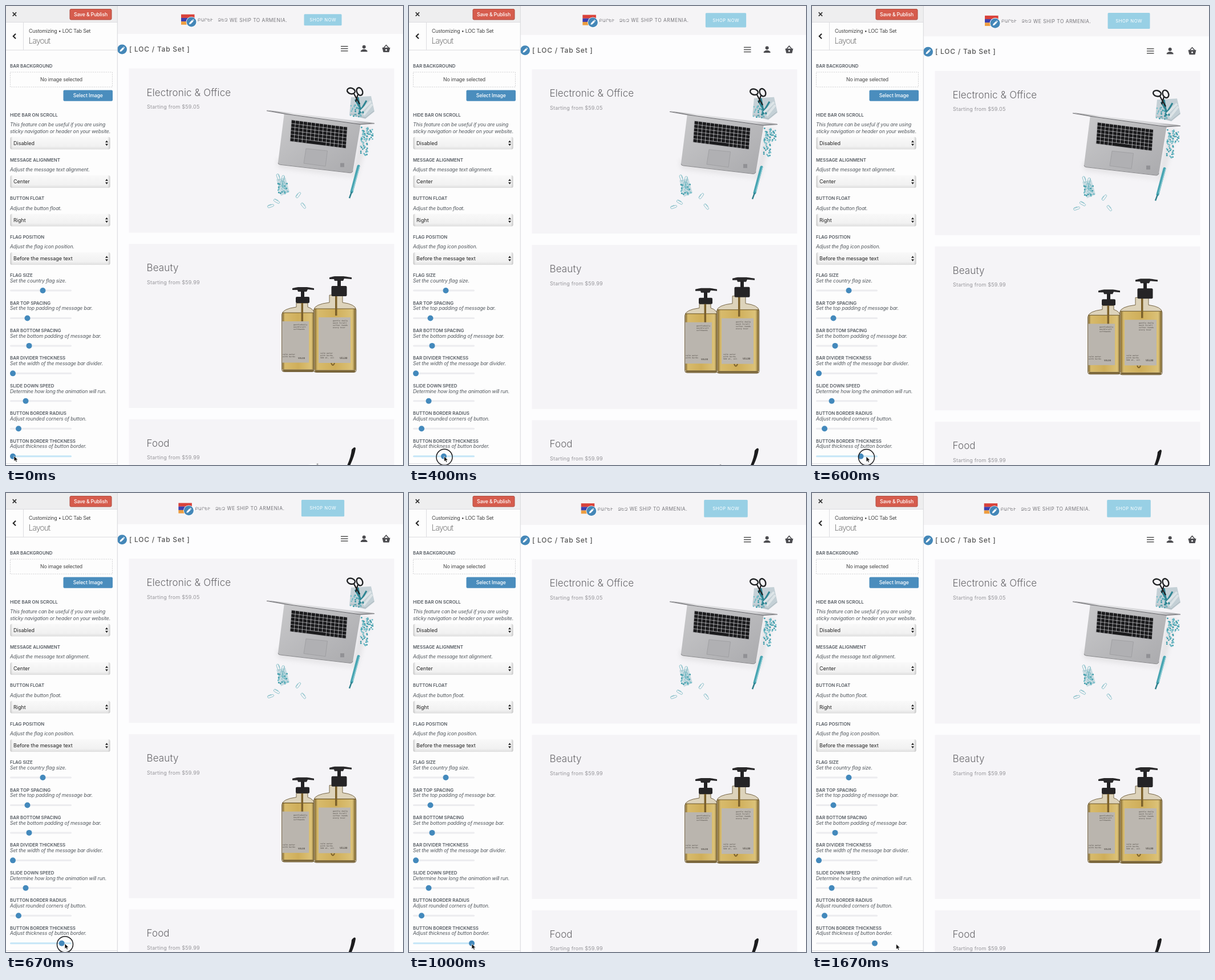
An HTML page for the animation above (1740 ms loop, 696 px wide and 805 px high).

```html
<!DOCTYPE html>
<html lang="en">
<head>
<meta charset="utf-8">
<title>Layout panel</title>
<style>
html, body { margin: 0; width: 100%; height: 100%; overflow: hidden; background: #fdfdfe; }
svg { display: block; width: 100vw; height: 100vh; font-family: Inter, "Open Sans", sans-serif; }
.label { font-size: 7.9px; font-weight: 600; fill: #555b62; }
.note { font-size: 8.7px; font-style: italic; letter-spacing: -.15px; fill: #50565c; }
.ui { font-size: 8.7px; letter-spacing: -.15px; fill: #444; }
.button { font-weight: 500; fill: #fff; text-anchor: middle; }
.value { font-size: 9px; fill: #222; }
.title { font-size: 17px; font-weight: 300; letter-spacing: .12px; fill: #68676b; }
.price { font-size: 9px; letter-spacing: .22px; fill: #97969b; }
.brand { font-size: 12px; font-weight: 500; letter-spacing: .75px; fill: #555; }
.message { font-size: 8.4px; letter-spacing: .5px; fill: #77767b; }
.armenian { font: 7.3px "DejaVu Sans", sans-serif; letter-spacing: .3px; fill: #77767b; }
.tiny { font: 700 3.1px "DejaVu Sans Mono", monospace; letter-spacing: .35px; fill: #5d5852; }
</style>
</head>
<body>
<svg id="stage" viewBox="0 0 696 805" preserveAspectRatio="none">
  <defs>
    <linearGradient id="select" x2="0" y2="1">
      <stop stop-color="#f9f9f9"/><stop offset=".75" stop-color="#f1f1f1"/><stop offset="1" stop-color="#dedede"/>
    </linearGradient>
    <linearGradient id="edge">
      <stop stop-color="#aaa" stop-opacity=".65"/><stop offset=".025" stop-color="#ccc" stop-opacity="0"/>
      <stop offset=".975" stop-color="#ccc" stop-opacity="0"/><stop offset="1" stop-color="#aaa" stop-opacity=".65"/>
    </linearGradient>
    <linearGradient id="deck" x2="1" y2="1">
      <stop stop-color="#c9c9cb"/><stop offset="1" stop-color="#aaaaad"/>
    </linearGradient>
    <linearGradient id="lid">
      <stop stop-color="#8a8a8d"/><stop offset=".25" stop-color="#e4e4e6"/><stop offset=".8" stop-color="#d2d2d5"/><stop offset="1" stop-color="#9a9a9d"/>
    </linearGradient>
    <linearGradient id="oil">
      <stop stop-color="#7d642f"/><stop offset=".08" stop-color="#d8bb6c"/><stop offset=".5" stop-color="#cfae5a"/>
      <stop offset=".92" stop-color="#dcc278"/><stop offset="1" stop-color="#77602c"/>
    </linearGradient>
    <filter id="blur"><feGaussianBlur stdDeviation="4"/></filter>
  </defs>
</svg>
<script>
const stage = document.getElementById("stage");
const text = (kind, x, y, words, extra = "") => `<text class="${kind}" x="${x}" y="${y}" ${extra}>${words}</text>`;
const rect = (x, y, w, h, fill, extra = "") => `<rect x="${x}" y="${y}" width="${w}" height="${h}" fill="${fill}" ${extra}/>`;
const path = (d, fill, extra = "") => `<path d="${d}" fill="${fill}" ${extra}/>`;
const line = (d, color, width, extra = "") => path(d, "none", `stroke="${color}" stroke-width="${width}" ${extra}`);
const dot = (x, y, r, fill, extra = "") => `<circle cx="${x}" cy="${y}" r="${r}" fill="${fill}" ${extra}/>`;
const group = (attrs, body) => `<g ${attrs}>${body}</g>`;
const range = n => [...Array(n).keys()];

let seed = 11;
const random = () => (seed = (seed * 16807) % 2147483647) / 2147483647;

const badge = (x, y) => group(`transform="translate(${x} ${y})"`,
  dot(0, 0, 9.3, "#fff") + dot(0, 0, 8.5, "#4487b8") +
  path("M-4 4L-3.3 1.2L1.4-3.5L3.6-1.3L-1.1 3.4ZM2-4L3-4.8L4.8-3L4.1-1.9Z", "#fff"));

// Settings panel
const SLIDER_TOP = 472.3, SLIDER_STEP = 48.45, LAST_Y = SLIDER_TOP + 6 * SLIDER_STEP + 26.7;

const selectBox = (y, value) =>
  rect(7.5, y - 11, 175, 22, "url(#select)", 'rx="3"') + rect(7.5, y - 11, 175, 22, "url(#edge)", 'rx="3"') +
  text("value", 13, y + 3.2, value) +
  path(`M174 ${y - 1.2}l2.5-3.6l2.5 3.6ZM174 ${y + 1.2}l2.5 3.6l2.5-3.6Z`, "#222");

const choices = [
  [191, "HIDE BAR ON SCROLL", 240.5, "Disabled"],
  [270, "MESSAGE ALIGNMENT", 308, "Center", "Adjust the message text alignment."],
  [337.5, "BUTTON FLOAT", 375.5, "Right", "Adjust the button float."],
  [405, "FLAG POSITION", 443, "Before the message text", "Adjust the flag icon position."]
].map(([y, name, boxY, value, note]) => text("label", 7, y + 2.8, name) +
  (note ? text("note", 7, y + 20, note) : "") + selectBox(boxY, value)).join("");

const sliders = [
  ["FLAG SIZE", "Set the country flag size.", 64.5],
  ["BAR TOP SPACING", "Set the top padding of message bar.", 37.5],
  ["BAR BOTTOM SPACING", "Set the bottom padding of message bar.", 40.5],
  ["BAR DIVIDER THICKNESS", "Set the width of the message bar divider.", 12],
  ["SLIDE DOWN SPEED", "Determine how long the animation will run.", 34.5],
  ["BUTTON BORDER RADIUS", "Adjust rounded corners of button.", 22],
  ["BUTTON BORDER THICKNESS", "Adjust thickness of button border.", 12]
].map(([name, note, x], i) => {
  const y = SLIDER_TOP + i * SLIDER_STEP, last = i === 6;
  return text("label", 7, y + 2.8, name) + text("note", 7, y + 12.4, note) +
    rect(7, y + 25.2, 108, 3, "#ececef", `rx="1.5" ${last ? 'id="track"' : ""}`) +
    dot(x, y + 26.7, 5, "#4389bc", last ? 'id="thumb"' : "");
}).join("");

const panel = rect(0, 0, 195, 805, "#fdfdfd") + rect(0, 0, 195, 28.5, "#eeeeef") +
  line("M0 28.5H195M30.5 28.5V77M0 77.3H195M0 802.5H195", "#dddde0", 1) + line("M195.3 0V805", "#d8d8db", 1) +
  line("M11.7 11.2l6.4 6.4m0-6.4l-6.4 6.4", "#333", 1.7) +
  rect(112, 5.5, 73, 18.5, "#d65c4d", 'rx="2" stroke="#b04a3e"') + text("ui button", 148.5, 17.8, "Save &amp; Publish") +
  line("M17 48.7l-4.3 4.3l4.3 4.3", "#222", 2) +
  text("ui", 40, 47.3, "Customizing • LOC Tab Set", 'style="font-size:8.9px;letter-spacing:-.25px"') +
  text("ui", 39.5, 66, "Layout", 'style="font-size:13.8px;font-weight:200;letter-spacing:-.75px"') +
  text("label", 7, 107.8, "BAR BACKGROUND") +
  rect(7.5, 116, 179, 26, "none", 'stroke="#c8c8cb" stroke-dasharray="2.2 1.6" stroke-width=".8"') +
  text("ui", 97, 132, "No image selected", 'text-anchor="middle"') +
  rect(100.5, 147.5, 86.5, 19.3, "#4a8dbd", 'rx="2"') + text("ui button", 143.7, 160.2, "Select Image") +
  text("note", 7, 210.8, "This feature can be useful if you are using") +
  text("note", 7, 222.5, "sticky navigation or header on your website.") + choices + sliders;

// Product pictures
const clip = (x, y, angle) => line("M-5-1H4a2 2 0 0 1 0 4H-4a2 2 0 0 1 0-5H2", "#7fbcc6", .9,
  `transform="translate(${x} ${y}) rotate(${angle}) scale(.9)"`);

const beads = (n, x, y, w, h, r) => range(n).map(() => {
  const v = random();
  return dot((x + (random() - .5) * w).toFixed(1), (y + (v - .5) * h).toFixed(1), r, random() < .5 ? "#3e9caa" : "#75bdc8");
}).join("");

const ring = (x, y, angle) =>
  `<ellipse cx="${x}" cy="${y}" rx="7" ry="5" fill="none" stroke="#202224" stroke-width="2.4" transform="rotate(${angle} ${x} ${y})"/>`;

const keys = range(6).flatMap(row => range(14).map(col =>
  row === 5 && col > 3 && col < 9 ? "" : rect(col + .06, row + .07, .88, .86, "#1b1b1d", 'rx=".1"'))).join("") +
  rect(4.06, 5.07, 4.88, .86, "#1b1b1d");

const laptop =
  path("M474 268L606 295L626 210L640 214L615 301L478 284Z", "#888", 'opacity=".16" filter="url(#blur)"') +
  path("M488 187L622 206L608 290Q607 293 603 292.5L480 278Q477 277.5 477 274Z", "url(#deck)") +
  line("M477 275Q477 278 481 278.3L603 292.7Q607 293 608 289", "#8a8a8d", 1) +
  path("M457 182.5L646 205L621 208L488 189.5Z", "url(#lid)") +
  line("M457 183.7L488 189L621 207.5L646 206", "#55555a", .9) +
  group('transform="matrix(7 .9 -.42 6.25 500.5 199.7)"', rect(-.08, -.08, 14.16, 6.16, "#a9a9ac") + keys) +
  path("M526 250L563.5 254L560 281L522 276Z", "#b0b0b3", 'stroke="#98989b" stroke-width=".7"') +
  rect(586, 275.5, 7, 7, "#919195");

const scissors =
  path("M605 160L640 158L646 185L630 198L602 191Z", "#bccbd1", 'opacity=".85"') +
  beads(30, 613, 184, 18, 20, 1.3) +
  line("M612 164L628 190M617 160L622 188M632 166L618 190", "#2f8593", 3) +
  line("M640 167L622 185M642 172L627 191", "#dde4e7", 4) + line("M604 189L630 196L645 184", "#aab4ba", 1) +
  line("M610 154L620 172M617 155L613 168", "#1d1e20", 2.2) +
  ring(605, 149, 15) + ring(620, 150, 65);

const desk = laptop + scissors +
  beads(42, 633, 225, 20, 24, 1.4) + beads(32, 628, 246, 12, 32, 1.4) +
  line("M618 281L606 326", "#48a5b2", 5, 'stroke-linecap="round"') + line("M606 326L602 337", "#2f7f8c", 2.5) +
  line("M620 281L608 324", "#9bd2da", 1.3) +
  path("M474 304L490 301L497 326L482 333Z", "#b8d3da", 'opacity=".75"') + beads(20, 486, 320, 18, 20, 1.5) +
  clip(478, 300, 70) + clip(486, 303, 100) + clip(488, 312, 60) + clip(483, 312, 110) + clip(489, 322, 30) +
  clip(475, 342, 28) + clip(464, 350, -20) + clip(512, 331, -55) + clip(522, 350, 50);

const labelText = (x, y, rows) => rows.map((row, i) => text("tiny", x, y + i * 4, row)).join("");

const pump = (x, y, spout, end, capW, capH) =>
  path(`M${spout} ${y + 2}Q${x - 9} ${y} ${x - 8} ${y}H${x + 8}Q${x + 9} ${y} ${end} ${y + 2}V${y + 5}L${x + 9} ${y + 4}L${x + 7} ${y + 8}H${x - 8}L${x - 9} ${y + 5}H${spout}Z`, "#29282a") +
  rect(x - 3, y + 7, 6, 13, "#222123") + rect(x - capW / 2, y + 17, capW, capH, "#252426", 'rx="2"');

// Glass outline with clear shoulders above the liquid level
const bottle = (left, right, neckL, neckR, top, shoulder, level, bottom) =>
  path(`M${neckL} ${top}H${neckR}V${shoulder - 8}Q${right - 1} ${shoulder - 5} ${right} ${shoulder + 5}V${bottom - 4}Q${right} ${bottom} ${right - 4} ${bottom}H${left + 4}Q${left} ${bottom} ${left} ${bottom - 4}V${shoulder + 5}Q${left + 1} ${shoulder - 5} ${neckL} ${shoulder - 8}Z`,
    "#ddd3bb", 'stroke="#6b5a38" stroke-width=".9"') +
  path(`M${left + 1} ${level}H${right - 1}V${bottom - 4}H${left + 1}Z`, "url(#oil)") +
  line(`M${left + 1} ${level}H${right - 1}`, "#6a5426", 1.1) +
  rect(left + 2, bottom - 4, right - left - 4, 3.5, "#7a6538") +
  rect((neckL + neckR) / 2 - 1.5, top, 3.5, 36, "#7c612b");

const smallBottle = bottle(483.5, 541, 509, 529, 521, 536, 538, 641.5) +
  pump(520, 493, 502, 540, 24, 11) + rect(484, 553, 47, 72.5, "#bab5ae") +
  labelText(504, 560, ["gentledaily", "washforall", "softhands"]) + labelText(485, 612, ["calm water", "with herbs"]) +
  text("tiny", 512, 619, "VELDO", 'style="letter-spacing:0;font-size:4px"');

const largeBottle = bottle(539.5, 614, 567, 590, 507, 528, 531, 642.5) +
  line("M570 626q3 8 6 0", "#7c612b", 2) +
  pump(584, 474, 567, 606, 27, 18) + rect(548, 546, 56, 80, "#bcb7b0") +
  labelText(573, 553, ["gentle daily", "wash forall", "softer hands", "every hour"]) +
  labelText(551, 610, ["calm water", "with herbs", "500 ml, oil"]) +
  text("tiny", 585, 618.5, "VELDO", 'style="letter-spacing:0;font-size:4.5px"');

// Shop page
const card = (y, h, name, price) => rect(215.5, y, 465, h, "#f5f4f7") +
  text("title", 246.5, y + 48, name) + text("price", 247, y + 70.6, `Starting from $${price}`);

const icons = line("M587 70.7H599.5M587 74.7H599.5M587 78.7H599.5", "#555", 1.5) +
  dot(627.7, 71.8, 3, "#4c4c50") + path("M621.8 80.3V78.5Q624 75.7 627.7 75.7T633.5 78.5V80.3Z", "#4c4c50") +
  path("M659.5 73H673.5L671.5 81H661.5Z", "#4c4c50") + line("M662 73.5L666.5 68.5L671 73.5", "#4c4c50", 1.5) +
  dot(666.5, 77, 1.5, "#fff");

const page = badge(203.5, 76) + text("brand", 216, 80, "[ LOC / Tab Set ]") + icons +
  card(109.5, 288, "Electronic &amp; Office", "59.05") + desk +
  card(417.3, 287.7, "Beauty", "59.99") + smallBottle + largeBottle +
  card(724.8, 288, "Food", "59.99") +
  path("M606 778Q612 771 613 776Q611 790 602 808H597Q605 791 606 778Z", "#1c1c1e") +
  path("M528 806Q538 799 552 806Z", "#fff") + dot(546, 803.5, 1.5, "#aaa");

const message = rect(307, 14.7, 23.5, 6.2, "#d9423a") + rect(307, 20.9, 23.5, 6.2, "#3c3fae") + rect(307, 27.1, 23.5, 5.7, "#ee9d3f") +
  badge(325, 28) + text("armenian", 336, 27.3, "ԲԱՐԵՒ") + text("armenian", 371.5, 27.3, "ՁԵԶ") +
  text("message", 392, 27.5, "WE SHIP TO ARMENIA.");

stage.insertAdjacentHTML("beforeend",
  rect(195, 0, 501, 805, "#fdfdfe") +
  group('id="page"', page) + rect(195.5, 0, 501, 49, "#f5f4f6", 'id="bar"') + group('id="message"', message) +
  rect(522.5, 14.3, 66, 20, "#98d0e5", 'id="shop" rx="1.5"') +
  text("message", 555.7, 27.3, "SHOP NOW", 'id="shopText" text-anchor="middle" style="font-size:7.7px;fill:#fff"') +
  panel +
  group('id="cursor"', dot(.5, 1.5, 14, "none", 'id="ring" stroke="#1c1c1e" stroke-width="1.5"') +
    path("M0 0V9.3L2.2 7.3L3.7 10.5L5.4 9.7L4 6.7H7Z", "#111", 'stroke="#fff" stroke-width=".7"')));

const part = Object.fromEntries([...stage.querySelectorAll("[id]")].map(el => [el.id, el]));
const set = (el, attrs) => { for (const name in attrs) el.setAttribute(name, attrs[name]); };

const LOOP = 1740;
const cursorX = [14, 14, 18, 26, 37, 50, 61.5, 74, 85, 95, 103, 107, 107.5, 107.5, 107.5, 110, 119, 132, 143, 147.5];
const levels = [0, 0, 0, 0, 1, 2, 4, 5, 5, 6, 7, 8];
const at = (list, i) => list[Math.min(i, list.length - 1)];

function draw(time) {
  const step = Math.min(25, Math.floor((time % LOOP + 4) * .015));
  const level = at(levels, step), border = level * .66;
  const height = 20 + 2 * border, drop = Math.max(0, height - 23.6), mid = 24.2 + drop * .43;
  set(part.page, { transform: `translate(0 ${drop})` });
  set(part.bar, { height: 49 + drop });
  set(part.message, { transform: `translate(${-border} ${drop / 2})` });
  set(part.shop, { x: 522.5 - border, y: mid - height / 2, width: 66 + 2 * border, height });
  set(part.shopText, { y: mid + 2.8 });
  set(part.thumb, { cx: 12 + level * 12.25 });
  set(part.track, { fill: step < 18 ? "#c5e6f7" : "#ececef" });
  set(part.cursor, { transform: `translate(${at(cursorX, step)} ${LAST_Y - .5 + Math.min(step, 19) * .1})` });
  set(part.ring, { visibility: (step > 0 && step < 15) || (step > 17 && step < 22) ? "visible" : "hidden" });
}

const start = performance.now();
function tick() {
  draw(performance.now() - start);
  requestAnimationFrame(tick);
}
tick();
</script>
</body>
</html>
```
